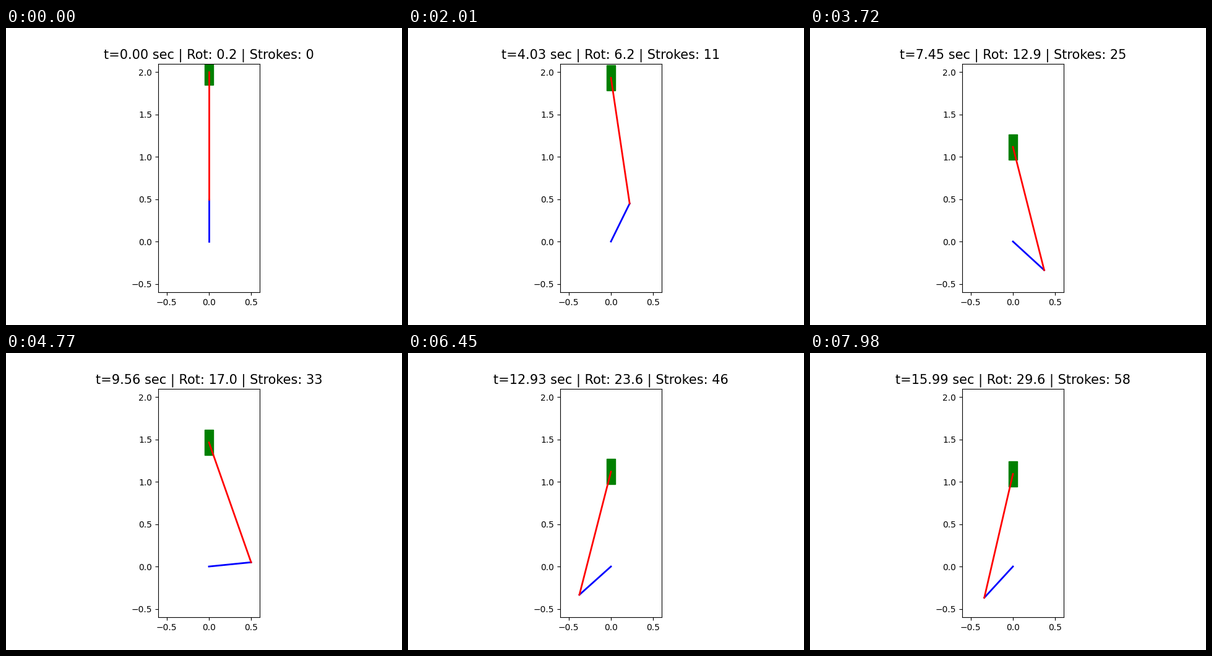
Animation, 640 px wide and 480 px high, one loop 8 s. Source, as a matplotlib script:

```python
import numpy as np
import matplotlib.pyplot as plt
from matplotlib.animation import FuncAnimation
from matplotlib.patches import Rectangle

plt.rcParams["font.family"] = "DejaVu Sans"

LOOP_MS = 8000
FRAMES = 267
DT = 30 / 499            # simulated seconds per frame

CRANK, ROD = 0.5, 1.5
PISTON_W, PISTON_H = 0.1, 0.3

TOP_SPEED = 1.9621       # turns per second once up to speed
SPIN_UP, SOFTNESS = 0.7051, 1.85
RIPPLE = 0.007           # turns


def spin():
    """Turns of the crank at each frame, starting at top dead centre."""
    fine = np.linspace(0, FRAMES * DT, 20001)
    gain = (1 - np.exp(-fine / SPIN_UP)) ** SOFTNESS
    step = fine[1] - fine[0]
    area = np.concatenate([[0], np.cumsum((gain[1:] + gain[:-1]) / 2) * step])
    turns = 0.25 + TOP_SPEED * area
    turns += RIPPLE * gain * np.sin(2 * np.pi * turns)
    return np.interp(np.arange(FRAMES) * DT, fine, turns)


TURNS = spin()

fig, ax = plt.subplots(figsize=(6.4, 4.8), dpi=100)
ax.set_aspect("equal")
ax.set_xlim(-0.6, 0.6)
ax.set_ylim(-0.6, 2.1)

title = ax.set_title("", fontsize=15)
piston = ax.add_patch(Rectangle((-PISTON_W / 2, 0), PISTON_W, PISTON_H, color="green"))
crank, = ax.plot([], [], color="blue", lw=2)
rod, = ax.plot([], [], color="red", lw=2)


def draw(i):
    turns = TURNS[i]
    angle = 2 * np.pi * turns
    x, y = CRANK * np.cos(angle), CRANK * np.sin(angle)
    top = y + np.sqrt(ROD**2 - x**2)

    crank.set_data([0, x], [0, y])
    rod.set_data([x, 0], [y, top])
    piston.set_y(top - PISTON_H / 2)

    strokes = int(2 * (turns - 0.25))
    title.set_text(f"t={i * DT:.2f} sec | Rot: {turns:.1f} | Strokes: {strokes}")
    return crank, rod, piston, title


anim = FuncAnimation(fig, draw, frames=FRAMES, init_func=lambda: draw(0),
                     interval=LOOP_MS / FRAMES, repeat=True, repeat_delay=0)
plt.show()
```
